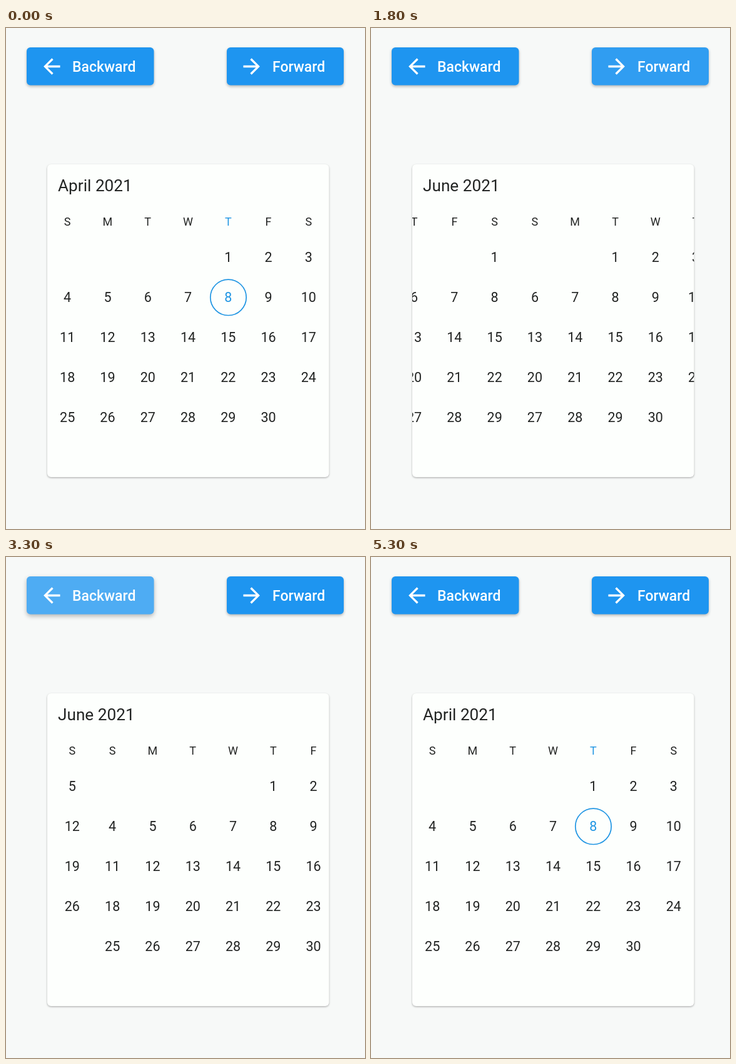
An HTML page with a canvas that plays this animation: 574x801 px, repeating every 5400 ms.

```html
<!DOCTYPE html>
<html lang="en">
<head>
<meta charset="utf-8">
<title>Calendar paging</title>
<style>
  html, body { margin: 0; width: 100%; height: 100%; overflow: hidden; background: #f7f9f8; }
  canvas { display: block; }
</style>
</head>
<body>
<canvas id="stage" width="574" height="801"></canvas>
<script>
const ctx = document.getElementById('stage').getContext('2d');
const LOOP = 5400, STEP = 100, SLIDE = 500;
const BLUE = '#1e95f0', ACCENT = '#2196e3', INK = '#222423';
const CARD = { x: 66, y: 218, w: 450.5, h: 500 };
const PAGE = 450, COL = PAGE / 7, ROW = 64;
const YEAR = 2021, FIRST_MONTH = 3, TODAY = 8;
const MONTHS = ['April', 'May', 'June', 'July'];

const buttons = [
  { label: 'Backward', x: 33, w: 203.5, textX: 106, iconX: 73.3, dir: -1 },
  { label: 'Forward', x: 353, w: 187, textX: 426, iconX: 392.7, dir: 1 }
];
const arrow = new Path2D('M8 -1H-4.17L1.42 -6.59L0 -8L-8 0L0 8L1.41 6.59L-4.17 1H8Z');

// press: finger down, start: finger up and the page begins to slide
const taps = [
  { press: 90, start: 533, dir: 1, x: 452, y: 64 },
  { press: 1350, start: 1482, dir: 1, x: 455, y: 62 },
  { press: 2050, start: 2316, dir: 1, x: 452, y: 64 },
  { press: 3090, start: 3220, dir: -1, x: 128, y: 64 },
  { press: 3790, start: 4000, dir: -1, x: 123.5, y: 72 },
  { press: 4550, start: 4800, dir: -1, x: 143.5, y: 54 }
];

const clamp = v => Math.max(0, Math.min(1, v));

function text(str, x, y, size, color = INK, align = 'center', weight = 400) {
  ctx.font = `${weight} ${size}px Roboto, sans-serif`;
  ctx.textAlign = align;
  ctx.fillStyle = color;
  ctx.fillText(str, x, y);
}

function disc(x, y, r, alpha) {
  ctx.fillStyle = `rgba(255,255,255,${alpha})`;
  ctx.beginPath();
  ctx.arc(x, y, r, 0, 7);
  ctx.fill();
}

function panel(x, y, w, h, color, shadowY, blur, alpha) {
  ctx.save();
  ctx.shadowColor = `rgba(0,0,0,${alpha})`;
  ctx.shadowOffsetY = shadowY;
  ctx.shadowBlur = blur;
  ctx.fillStyle = color;
  ctx.beginPath();
  ctx.roundRect(x, y, w, h, 6);
  ctx.fill();
  ctx.restore();
}

function drawRipple(tap, t) {
  const since = t - tap.start;
  const held = Math.min(t, tap.start) - tap.press;
  const radius = 17 + held * 0.065 + clamp(since / 200) * 220;
  const alpha = since < 0 ? 0.1 : Math.min(0.1 + since * 0.0014, (363 - since) * 0.00176);
  if (alpha <= 0) return;
  disc(tap.x, tap.y, radius, alpha);
  if (since <= 0) disc(tap.x, tap.y, radius * 0.72, 0.1);
}

function drawButton(b, t) {
  const tap = taps.find(p => p.dir === b.dir && t >= p.press && t < p.start + 400);
  const lift = tap ? clamp((t - tap.press) / 200) * clamp(1 - (t - tap.start) / 250) : 0;
  panel(b.x, 31, b.w, 60.5, BLUE, 2 + lift * 1.5, 4 + lift * 5, 0.28);
  if (tap) {
    ctx.save();
    ctx.beginPath();
    ctx.roundRect(b.x, 31, b.w, 60.5, 6);
    ctx.clip();
    drawRipple(tap, t);
    ctx.restore();
  }
  text(b.label, b.textX, 70, 23, '#fff', 'left', 500);
  ctx.save();
  ctx.translate(b.iconX, 61.5);
  ctx.scale(-b.dir * 1.65, 1.65);
  ctx.fill(arrow);
  ctx.restore();
  if (tap && t <= tap.start + 40) disc(tap.x, tap.y, 17.5, 0.6);
}

function drawMonth(index, left) {
  const month = FIRST_MONTH + index;
  const offset = new Date(YEAR, month, 1).getDay();
  const days = new Date(YEAR, month + 1, 0).getDate();
  const todayCol = index === 0 ? (offset + TODAY - 1) % 7 : -1;
  const colX = col => left + (col + 0.5) * COL;

  [...'SMTWTFS'].forEach((d, col) =>
    text(d, colX(col), 316, 18, col === todayCol ? ACCENT : INK));
  for (let day = 1; day <= days; day++) {
    const cell = offset + day - 1;
    const x = colX(cell % 7), y = 374.3 + Math.floor(cell / 7) * ROW;
    const today = index === 0 && day === TODAY;
    text(day, x, y, 21.5, today ? ACCENT : INK);
    if (today) {
      ctx.strokeStyle = ACCENT;
      ctx.lineWidth = 1.7;
      ctx.beginPath();
      ctx.arc(x + 0.2, y - 7.5, 28.7, 0, 7);
      ctx.stroke();
    }
  }
}

function draw(t) {
  ctx.fillStyle = '#f7f9f8';
  ctx.fillRect(0, 0, 574, 801);
  buttons.forEach(b => drawButton(b, t));

  let current = 0, position = 0;
  for (const tap of taps) {
    if (t >= tap.start) current += tap.dir;
    position += tap.dir * clamp((t - tap.start) / SLIDE);
  }

  panel(CARD.x, CARD.y, CARD.w, CARD.h, '#fdfffd', 1.3, 3, 0.3);
  text(`${MONTHS[current]} ${YEAR}`, 83, 260.5, 26.2, INK, 'left');
  ctx.save();
  ctx.beginPath();
  ctx.rect(CARD.x, CARD.y, CARD.w, CARD.h);
  ctx.clip();
  MONTHS.forEach((_, i) => {
    const shift = (i - position) * PAGE;
    if (Math.abs(shift) < PAGE) drawMonth(i, CARD.x + shift);
  });
  ctx.restore();
}

function tick() {
  const t = performance.now() % LOOP;
  draw(Math.floor(t / STEP) * STEP);
  requestAnimationFrame(tick);
}
tick();
</script>
</body>
</html>
```
